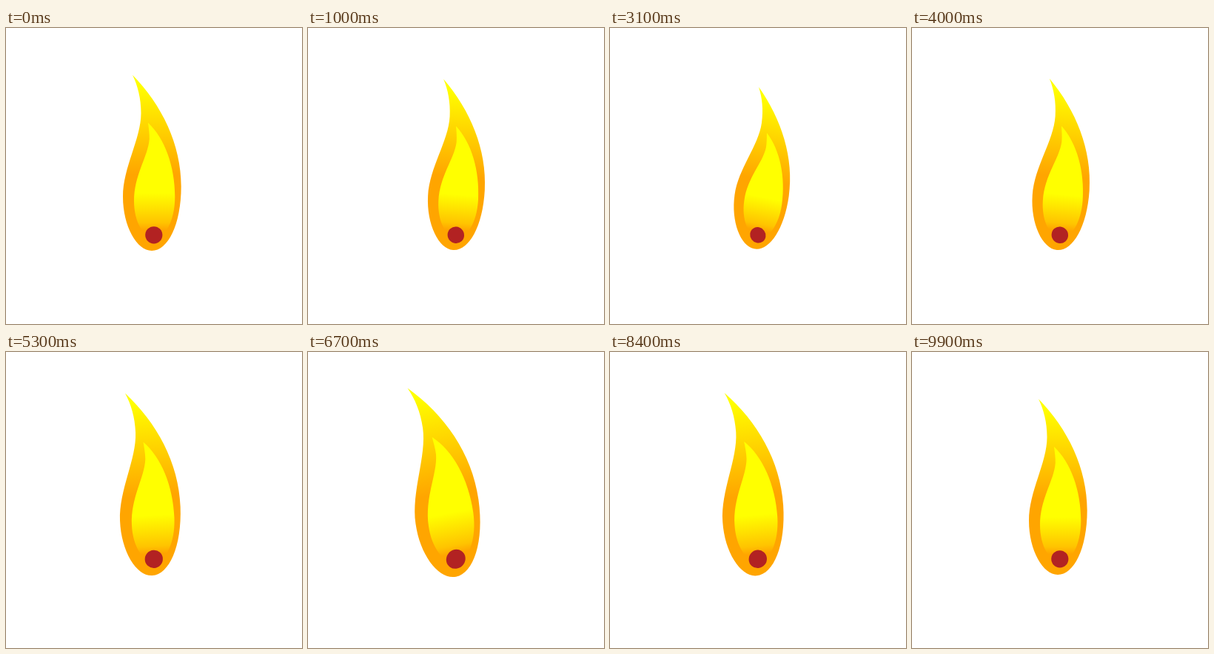
An HTML page with a canvas for the animation above (10000 ms loop, 400 by 400 pixels).

```html
<!DOCTYPE html>
<html lang="en">
<head>
<meta charset="utf-8">
<title>Flame</title>
<style>
  html, body { margin: 0; width: 100%; height: 100%; overflow: hidden; background: #fff; }
  canvas { display: block; width: 400px; height: 400px; }
</style>
</head>
<body>
<canvas id="stage" width="400" height="400"></canvas>
<script>
const ctx = document.getElementById('stage').getContext('2d');
const LOOP = 10000, STEP = 100;
const PIVOT = { x: 200, y: 280 };
const SKEW = 0.43; // vertical skew per unit of tilt

// time in ms, tilt in degrees, scale
const KEYS = [
  [0, 0, 1],
  [2900, 8.85, 0.905],
  [6600, -8.2, 1.121],
  [9900, 0, 1]
];

const outer = new Path2D(`M171 63.5
  C210.5 104 236.7 157 236.7 214
  C236.7 266 218.5 301 197 301
  C177 301 158 268 158 228
  C158 188 182.5 150 182.5 115
  C182.5 95 178 78 171 63.5Z`);

const inner = new Path2D(`M192 128
  C214.5 149 228.3 187 228.3 228
  C228.3 262 214 284 201 284
  C186 284 173 262 173 234
  C173 198 192 174 193.8 150
  C194 143 193 136 192 128Z`);

function fade(top, bottom, ...stops) {
  const g = ctx.createLinearGradient(0, top, 0, bottom);
  g.addColorStop(0, '#ffff00');
  for (const [at, color] of stops) g.addColorStop(at, color);
  g.addColorStop(1, '#ffa500');
  return g;
}
const outerFill = fade(76, 198);
const innerFill = fade(223, 273, [0.8, '#ffc400']);

function pose(t) {
  let i = 1;
  while (i < KEYS.length - 1 && t > KEYS[i][0]) i++;
  const a = KEYS[i - 1], b = KEYS[i];
  const k = Math.min(1, (t - a[0]) / (b[0] - a[0]));
  const mix = n => a[n] + (b[n] - a[n]) * k;
  return { tilt: mix(1) * Math.PI / 180, scale: mix(2) };
}

function draw(t) {
  const { tilt, scale } = pose(t);
  ctx.fillStyle = '#fff';
  ctx.fillRect(0, 0, 400, 400);
  ctx.save();
  ctx.translate(PIVOT.x, PIVOT.y);
  ctx.transform(1, Math.tan(tilt * SKEW), 0, 1, 0, 0);
  ctx.rotate(tilt);
  ctx.scale(scale, scale);
  ctx.translate(-PIVOT.x, -PIVOT.y);
  ctx.fillStyle = outerFill;
  ctx.fill(outer);
  ctx.fillStyle = innerFill;
  ctx.fill(inner);
  ctx.fillStyle = '#b22222';
  ctx.beginPath();
  ctx.arc(199.8, 279.8, 11.6, 0, Math.PI * 2);
  ctx.fill();
  ctx.restore();
}

const start = performance.now();
function tick() {
  const t = (performance.now() - start) % LOOP;
  draw(Math.floor(t / STEP) * STEP);
  requestAnimationFrame(tick);
}
tick();
</script>
</body>
</html>
```
